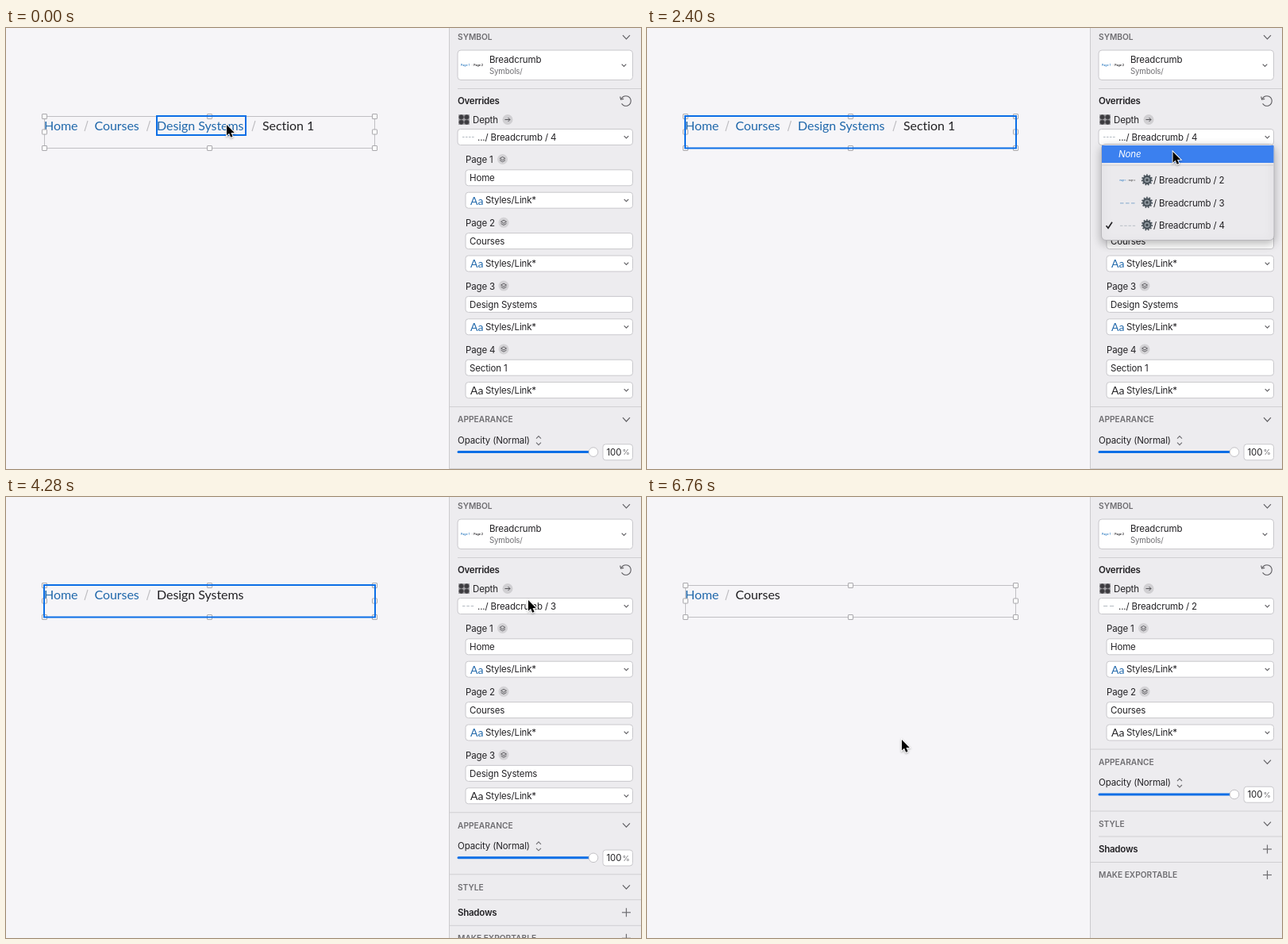
An HTML page with a canvas for the animation above (6800 ms loop, 800x556 px).

```html
<!DOCTYPE html>
<html lang="en">
<head>
<meta charset="utf-8">
<title>Breadcrumb overrides</title>
<style>
  html, body { margin: 0; width: 100%; height: 100%; overflow: hidden; background: #f6f5f8; }
  canvas { display: block; }
</style>
</head>
<body>
<canvas id="stage" width="800" height="556"></canvas>
<script>
const c = document.getElementById('stage').getContext('2d');
const LOOP = 6800, STEP = 40, PITCH = 79.8;
const INK = '#222124', GREY = '#6e6d71', LINK = '#2068ab', BLUE = '#0b6ee6';
const UI = 'Inter, sans-serif', CRUMB = 'Lato, sans-serif';

const pages = [
  { name: 'Home', x: 48, end: 91, slash: 101 },
  { name: 'Courses', x: 111.5, end: 170, slash: 179.5 },
  { name: 'Design Systems', x: 190, end: 302, slash: 312 },
  { name: 'Section 1', x: 323, end: 386 }
];

// Pointer path: time, x, y
const path = [
  [0, 278, 122], [120, 262, 124], [400, 140, 124], [520, 132, 125], [760, 68, 126],
  [900, 70, 128], [1340, 650, 212], [1520, 659, 206], [1640, 659, 204], [1960, 658, 131],
  [2280, 659, 134], [2560, 668, 190], [2840, 667, 218], [3180, 667, 218], [3560, 458, 232],
  [3760, 456, 233], [4160, 656, 134], [4280, 658, 130], [4640, 659, 133], [5040, 672, 187],
  [6060, 672, 187], [6480, 335, 314], [6760, 321, 306], [LOOP, 321, 306]
];
const menus = [{ open: 2080, click: 2960 }, { open: 4520, click: 5880 }];

function text(s, x, cy, color = INK, size = 11.5, style = '', family = UI, spacing = -0.15) {
  c.font = `${style} ${size}px ${family}`;
  c.letterSpacing = spacing + 'px';
  c.fillStyle = color;
  c.fillText(s, x, cy + size * 0.36);
}
const bold = (s, x, cy) => text(s, x, cy, INK, 11.5, '600', UI, -0.25);
const heading = (s, cy) => text(s, 569, cy, GREY, 10.2, '600', UI, 0);

function line(points, color = GREY, width = 1) {
  c.beginPath();
  points.forEach(([x, y]) => c.lineTo(x, y));
  c.strokeStyle = color;
  c.lineWidth = width;
  c.stroke();
}
const rule = (y, x = 559) => line([[x, y], [800, y]], '#d0cfd2');

function circle(x, y, r, fill, stroke, width = 1) {
  c.beginPath();
  c.arc(x, y, r, 0, 7);
  if (fill) { c.fillStyle = fill; c.fill(); }
  if (stroke) { c.strokeStyle = stroke; c.lineWidth = width; c.stroke(); }
}

function box(x, y, w, h, r = 3.5, fill = '#fff', stroke = '#c9c8cc') {
  c.beginPath();
  c.roundRect(x, y, w, h, r);
  c.fillStyle = fill;
  c.fill();
  c.strokeStyle = stroke;
  c.lineWidth = 1;
  c.stroke();
}

const chevron = (x, y, w = 4.5, h = 2.4) =>
  line([[x - w, y - h], [x, y + h], [x + w, y - h]], '#626165', 1.2);
const plus = (x, y) => {
  line([[x - 5.5, y], [x + 5.5, y]], GREY, 1.2);
  line([[x, y - 5.5], [x, y + 5.5]], GREY, 1.2);
};

function dropdown(x, y) {
  box(x, y, 789.5 - x, 20);
  chevron(781.5, y + 10, 2.8, 1.4);
}

function dashes(x, y, n, w, color) {
  const d = w / n;
  for (let i = 0; i < n; i++) line([[x + i * d, y], [x + i * d + d * 0.65, y]], color, 1);
}

function tinyCrumb(x, y, size, last = INK) {
  text('Page 1', x, y, '#3b83c4', size, '600', UI, 0);
  text('/', x + size * 3.9, y, '#aaa', size, '', UI, 0);
  text('Page 2', x + size * 4.5, y, last, size, '600', UI, 0);
}

function layersIcon(x, y) {
  circle(x, y, 6.5, '#d3d2d5');
  line([[x - 3.5, y - 1], [x, y - 3], [x + 3.5, y - 1], [x, y + 1], [x - 3.5, y - 1]], '#555458', 0.9);
  line([[x - 3.5, y + 1.2], [x, y + 3.2], [x + 3.5, y + 1.2]], '#555458', 0.9);
}

function resetIcon(x, y) {
  c.beginPath();
  c.arc(x, y, 6.3, -2.7, 2.6);
  c.strokeStyle = '#59585c';
  c.lineWidth = 1.1;
  c.stroke();
  line([[x - 7.3, y - 5.5], [x - 6.4, y - 1.8], [x - 2.8, y - 2.6]], '#59585c', 1.1);
}

function depthIcon(x, y) {
  c.fillStyle = '#a5a4a8';
  c.fillRect(x, y, 14, 13);
  for (const dx of [3.6, 10.4]) for (const dy of [3.3, 9.7])
    circle(x + dx, y + dy, 2.8, '#3b3a3e', '#565559', 0.8);
}

function gear(x, y) {
  circle(x, y, 4.6, '#8d969d', '#465058', 2.2);
  c.setLineDash([1.7, 1.8]);
  circle(x, y, 6.3, null, '#465058', 1.7);
  c.setLineDash([]);
  circle(x, y, 1.6, '#3c454c');
}

function drawCanvas(depth, hover) {
  c.fillStyle = '#f6f5f8';
  c.fillRect(0, 0, 800, 556);
  c.strokeStyle = '#c0bfc3';
  c.lineWidth = 1;
  c.strokeRect(48.5, 111.5, 416, 40);
  pages.slice(0, depth).forEach((p, i) => {
    const last = i === depth - 1;
    text(p.name, p.x, 123.5, last ? INK : LINK, 16, '', CRUMB, -0.05);
    if (!last) line([[p.slash - 2, 130], [p.slash + 2, 117]], '#bdbcc0', 1.1);
  });
  for (const x of [48.5, 256.5, 464.5]) for (const y of [111.5, 131, 151.5])
    if (x !== 256.5 || y !== 131) box(x - 3, y - 3, 6, 6, 0.5, '#fff', '#a9a8ac');
  c.strokeStyle = BLUE;
  c.lineWidth = 2;
  if (hover === 'all') c.strokeRect(48, 111, 417, 40.5);
  else if (hover >= 0) {
    const p = pages[hover];
    c.strokeRect(p.x, 111, p.end - p.x, 24);
  }
}

function drawPanel(depth) {
  c.fillStyle = '#edecef';
  c.fillRect(558, 0, 242, 556);
  line([[558.5, 0], [558.5, 556]], '#cbcacd');

  heading('SYMBOL', 11.5);
  chevron(781.5, 11.5);
  box(569, 28, 220.5, 37.5, 4);
  tinyCrumb(573, 46.5, 3.6);
  text('Breadcrumb', 609, 40);
  text('Symbols/', 609, 55, GREY, 9.7);
  chevron(778.5, 47, 2.8, 1.4);
  rule(76.5, 569);

  bold('Overrides', 569, 92);
  resetIcon(781, 92);
  depthIcon(570, 109);
  text('Depth', 588, 115.5);
  circle(632, 115.5, 6.5, '#d0cfd2');
  line([[628.5, 115.5], [635, 115.5]], '#555458');
  line([[632.5, 113], [635, 115.5], [632.5, 118]], '#555458');
  dropdown(569, 127.5);
  dashes(575, 137.5, depth, 16, '#b3bac1');
  text('.../ Breadcrumb / ' + depth, 594, 137.5);

  for (let i = 0; i < depth; i++) {
    const y = PITCH * i;
    text('Page ' + (i + 1), 579, y + 166);
    layersIcon(i ? 627 : 625.5, y + 165.5);
    box(579, y + 178.8, 210.5, 20);
    text(pages[i].name, 584, y + 189);
    dropdown(579, y + 207.2);
    text('Aa', 585, y + 217.5, i === depth - 1 ? INK : LINK, 14, '', CRUMB, 0);
    text('Styles/Link*', 604, y + 217.2);
  }

  const b = 158.4 + PITCH * depth;
  rule(b);
  heading('APPEARANCE', b + 16.2);
  chevron(781.5, b + 16);
  text('Opacity (Normal)', 569, b + 42.3);
  line([[668, b + 40], [671, b + 37], [674, b + 40]], GREY, 1.1);
  line([[668, b + 45], [671, b + 48], [674, b + 45]], GREY, 1.1);
  c.lineCap = 'round';
  line([[570, b + 57], [740, b + 57]], BLUE, 3);
  c.lineCap = 'butt';
  circle(740, b + 57, 5.8, '#fff', '#c3c2c6');
  box(752, b + 47.2, 37.5, 20);
  text('100', 756.5, b + 57.3);
  text('%', 776.5, b + 57.3, GREY, 9.5);
  rule(b + 78);
  heading('STYLE', b + 94.2);
  chevron(781.5, b + 94);
  rule(b + 110, 569);
  bold('Shadows', 569, b + 126.2);
  plus(781.5, b + 126);
  rule(b + 142.5);
  heading('MAKE EXPORTABLE', b + 158.7);
  plus(781.5, b + 158.5);
}

function drawMenu(checked, row, alpha) {
  c.save();
  c.globalAlpha = alpha;
  c.shadowColor = 'rgba(0,0,0,.28)';
  c.shadowBlur = 12;
  c.shadowOffsetY = 4;
  box(572.5, 146.5, 217.5, 121, 5.5, '#ebeaed', '#b8b7bb');
  c.shadowColor = 'transparent';
  line([[573, 173], [790, 173]], '#d0cfd2', 1.2);
  c.fillStyle = '#3b80ef';
  if (row === 1) c.fillRect(573, 148, 216.5, 22);
  if (row > 1) c.fillRect(573, 179 + 28.4 * (row - 2), 216.5, 28);
  text('None', 594, 159, row === 1 ? '#fff' : INK, 11.5, 'italic');
  for (let n = 2; n <= 4; n++) {
    const y = 192 + 28.4 * (n - 2), on = n === row;
    if (n === 2) tinyCrumb(595.5, y + 0.5, 2.5, on ? '#143a78' : '#555');
    else dashes(596, y + 0.5, n, 21, n === 3 ? '#82a9cd' : '#b7bec5');
    gear(630, y - 0.5);
    text('/ Breadcrumb / ' + n, 638, y, on ? '#fff' : INK);
    if (n === checked)
      line([[578.5, y + 0.5], [581, y + 3.5], [586, y - 4]], on ? '#fff' : INK, 1.6);
  }
  c.restore();
}

function drawPointer(x, y) {
  c.save();
  c.translate(x, y);
  c.beginPath();
  [[0, 0], [0, 13.6], [3.1, 10.8], [5.2, 15.8], [7.6, 14.8], [5.5, 9.9], [9.8, 9.9]]
    .forEach(p => c.lineTo(...p));
  c.closePath();
  c.shadowColor = 'rgba(0,0,0,.35)';
  c.shadowBlur = 2.5;
  c.shadowOffsetY = 1;
  c.strokeStyle = '#fff';
  c.lineWidth = 1.8;
  c.stroke();
  c.shadowColor = 'transparent';
  c.fillStyle = '#000';
  c.fill();
  c.restore();
}

function pointerAt(t) {
  const i = path.findIndex(k => k[0] > t);
  const [t0, x0, y0] = path[i - 1], [t1, x1, y1] = path[i];
  const u = (t - t0) / (t1 - t0), e = u * u * (3 - 2 * u);
  return [x0 + (x1 - x0) * e, y0 + (y1 - y0) * e];
}

// Which layer the pointer lights up, on the canvas or through its panel row
function hoverAt(x, y, depth) {
  if (x < 558) return pages.findIndex((p, i) => i < depth && x >= p.x && x <= p.end && y >= 111 && y <= 135);
  if (x > 569 && y >= 127 && y <= 148) return 'all';
  return pages.findIndex((p, i) => i < depth && x > 579 && y >= 179 + PITCH * i && y <= 228 + PITCH * i);
}

const rowAt = y => y >= 148 && y < 170 ? 1 : y >= 179 && y < 264 ? 2 + Math.floor((y - 179) / 28.4) : 0;

function draw(t) {
  const depth = 4 - menus.filter(m => t >= m.click + 200).length;
  const menu = menus.find(m => t >= m.open && t < m.click + 280);
  const [x, y] = pointerAt(t);
  const pressed = menu && t < menu.click + 200;
  drawCanvas(depth, pressed ? 'all' : hoverAt(x, y, depth));
  drawPanel(depth);
  if (menu) {
    const since = t - menu.click;
    const blink = since >= 0 && since < 80;
    const checked = 4 - menus.indexOf(menu);
    drawMenu(checked, blink ? 0 : rowAt(y), Math.min(1, 1 - (since - 160) / 120));
  }
  drawPointer(x, y);
}

const start = performance.now();
function tick() {
  const t = (performance.now() - start) % LOOP;
  draw(Math.floor(t / STEP) * STEP);
  requestAnimationFrame(tick);
}
tick();
</script>
</body>
</html>
```
